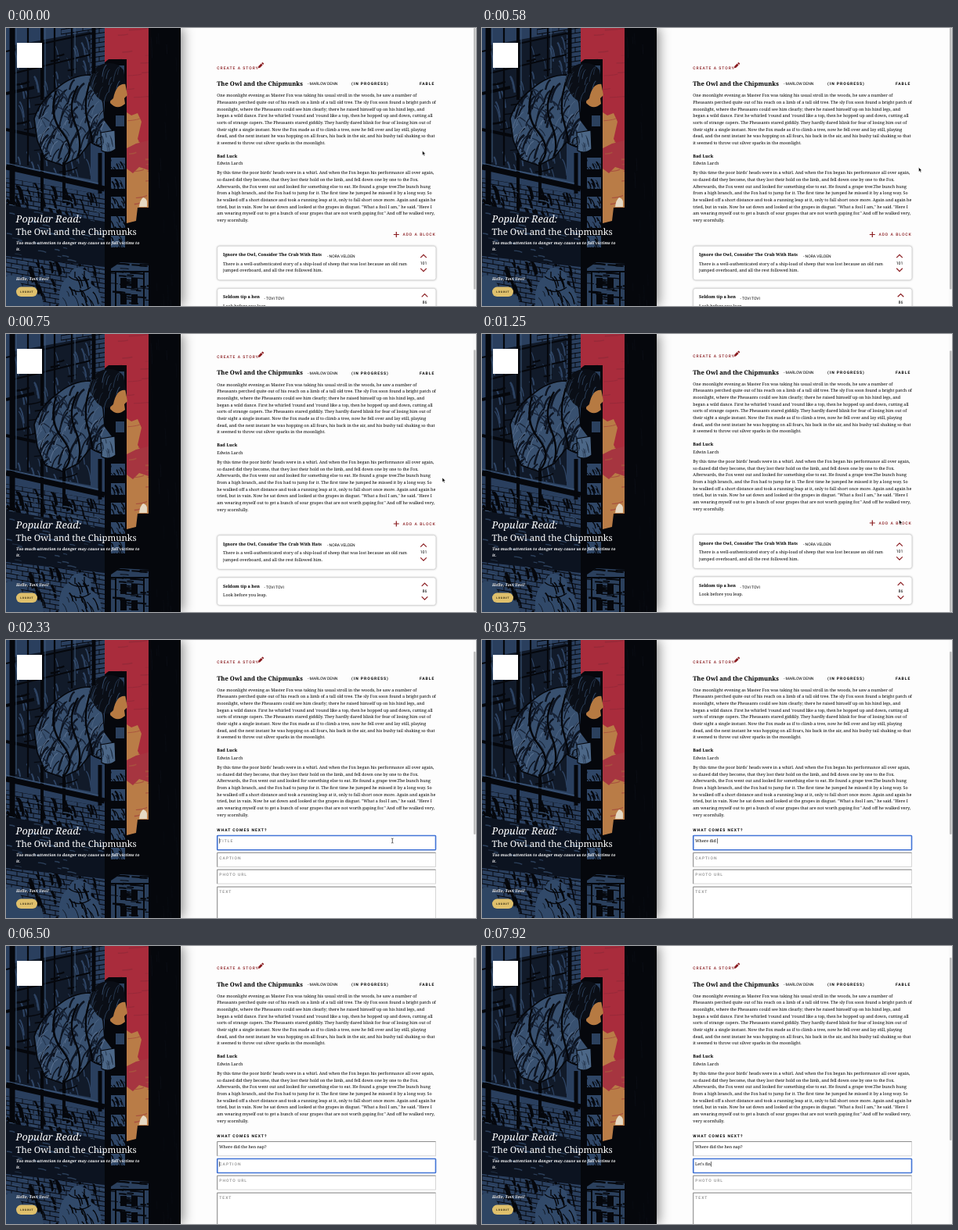
These frames come from a looping animation (600x356 px, 8000 ms). An HTML page with a canvas:

```html
<!DOCTYPE html>
<html lang="en">
<head>
<meta charset="utf-8">
<title>Story page</title>
<style>
html, body { margin: 0; width: 100%; height: 100%; overflow: hidden; background: #fdfdfd; }
svg, .panel { position: absolute; left: 0; top: 0; }
.panel { width: 223px; height: 356px; box-shadow: 3px 0 14px rgba(0,0,0,.45); }
canvas { display: block; }
text { text-rendering: geometricPrecision; white-space: pre; fill: #000; }
.body { font: 5.44px "Noto Serif", serif; }
.bold { font: bold 5.55px "Noto Serif", serif; }
.title { font: bold 7.7px "Noto Serif", serif; }
.by { font: 5px Roboto, sans-serif; }
.cap { font: bold 5px Roboto, sans-serif; letter-spacing: .97px; }
.link { font: 500 5px Roboto, sans-serif; letter-spacing: 1px; fill: #8a1c20; }
.hint { font: 500 5px Roboto, sans-serif; letter-spacing: 1px; fill: #8b8b8b; }
.vote { font: 5.2px Roboto, sans-serif; text-anchor: middle; }
.value { font: 5.3px "Noto Serif", serif; }
.lead { font: italic 12.7px "Noto Serif", serif; fill: #fff; }
.read { font: 11.4px "Noto Serif", serif; fill: #fff; }
.note { font: italic bold 5.1px "Noto Serif", serif; fill: #fff; }
.logout { font: bold 3.3px Roboto, sans-serif; letter-spacing: .7px; text-anchor: middle; fill: #2c2410; }
.card { fill: #fff; stroke: #cfcfcf; stroke-width: .7; filter: drop-shadow(0 .8px 1px rgba(0,0,0,.25)); }
.red { fill: none; stroke: #8a1c20; stroke-width: 1.2; }
</style>
</head>
<body>
<svg id="page" width="600" height="356"></svg>
<div class="panel"><canvas id="art" width="223" height="356"></canvas></div>
<svg id="over" width="223" height="356"></svg>
<script>
const LOOP = 8000, MAX_SCROLL = 22.5, FORM_AT = 1500, FOCUS_AT = 2250, NEXT_AT = 6050, HIDE_AT = 2750;
const STORY = "The Owl and the Chipmunks";

const page = document.getElementById("page"), over = document.getElementById("over");

function add(parent, tag, attrs = {}, str) {
  const el = document.createElementNS("http://www.w3.org/2000/svg", tag);
  for (const k in attrs) el.setAttribute(k, attrs[k]);
  if (str !== undefined) el.textContent = str;
  parent.appendChild(el);
  return el;
}
const text = (g, cls, x, y, str) => add(g, "text", { class: cls, x, y }, str);
const path = (g, d, attrs) => add(g, "path", { d, ...attrs });
const show = (el, on) => el.setAttribute("visibility", on ? "visible" : "hidden");

// Story
const doc = add(page, "g");
text(doc, "link", 269.3, 52.9, "CREATE A STORY");
path(doc, "M321.8 51.4l.7-2.6 3.2-3.2 1.9 1.9-3.2 3.2zM326.2 45.1l.9-.9q.4-.3.8 0l1.1 1.1q.3.4 0 .8l-.9.9z", { fill: "#8a1c20" });
text(doc, "title", 269.3, 74, STORY);
text(doc, "by", 385, 73.4, "- MARLOW DENN");
text(doc, "cap", 441, 73.2, "(IN PROGRESS)");
text(doc, "cap", 528, 73.2, "FABLE");

const lines = (g, y, step, rows) => rows.forEach((r, i) => text(g, "body", 269.3, y + i * step, r));
lines(doc, 88.3, 8.66, [
  "One moonlight evening as Master Fox was taking his usual stroll in the woods, he saw a number of",
  "Pheasants perched quite out of his reach on a limb of a tall old tree. The sly Fox soon found a bright patch of",
  "moonlight, where the Pheasants could see him clearly; there he raised himself up on his hind legs, and",
  "began a wild dance. First he whirled 'round and 'round like a top, then he hopped up and down, cutting all",
  "sorts of strange capers. The Pheasants stared giddily. They hardly dared blink for fear of losing him out of",
  "their sight a single instant. Now the Fox made as if to climb a tree, now he fell over and lay still, playing",
  "dead, and the next instant he was hopping on all fours, his back in the air, and his bushy tail shaking so that",
  "it seemed to throw out silver sparks in the moonlight."
]);
text(doc, "bold", 269.3, 165.8, "Bad Luck");
text(doc, "body", 269.3, 175.2, "Edwin Larch");
lines(doc, 187.4, 8.68, [
  "By this time the poor birds' heads were in a whirl. And when the Fox began his performance all over again,",
  "so dazed did they become, that they lost their hold on the limb, and fell down one by one to the Fox.",
  "Afterwards, the Fox went out and looked for something else to eat. He found a grape tree.The bunch hung",
  "from a high branch, and the Fox had to jump for it. The first time he jumped he missed it by a long way. So",
  "he walked off a short distance and took a running leap at it, only to fall short once more. Again and again he",
  "tried, but in vain. Now he sat down and looked at the grapes in disgust. \"What a fool I am,\" he said. \"Here I",
  "am wearing myself out to get a bunch of sour grapes that are not worth gaping for.\" And off he walked very,",
  "very scornfully."
]);

// Suggested blocks
const list = add(doc, "g");
path(list, "M498.3 261v7M494.8 264.5h7", { class: "red" });
text(list, "link", 506.5, 266.3, "ADD A BLOCK");

function card(y, h, title, by, byX, rows, votes, x) {
  const mid = y + h / 2;
  add(list, "rect", { class: "card", x: 269.7, y, width: 279.2, height: h, rx: 3 });
  text(list, "bold", 277, y + 12.9, title);
  text(list, "by", byX, y + 14.6, by);
  rows.forEach((r, i) => text(list, "body", 277, y + 24.4 + i * 8.6, r));
  path(list, `M${x - 3.8} ${mid - 6.8}l3.8 -3.8 3.8 3.8M${x - 3.8} ${mid + 6.8}l3.8 3.8 3.8 -3.8`, { class: "red" });
  text(list, "vote", x, mid + 1.9, votes);
}
card(279.2, 43.6, "Ignore the Owl, Consider The Crab With Hats", "- NORA VELDEN", 410, [
  "There is a well-authenticated story of a ship-load of sheep that was lost because an old ram",
  "jumped overboard, and all the rest followed him."
], "101", 533);
card(333.4, 35.4, "Seldom tip a hen", "- TOVI TOVI", 329.5, ["Look before you leap."], "86", 534.5);

// Form
const form = add(doc, "g");
text(form, "cap", 269.3, 267.3, "WHAT COMES NEXT?");

function field(y, h, hint) {
  const box = { x: 269.7, y, width: 278.8, height: h };
  add(form, "rect", { ...box, fill: "#fff", stroke: "#cdcdcd", "stroke-width": .8 });
  path(form, `M269.7 ${y + h}v${-h}h278.8`, { fill: "none", stroke: "#858585", "stroke-width": .9 });
  const ring = add(form, "rect", { ...box, rx: .8, fill: "none", stroke: "#4274d6", "stroke-width": 1.6 });
  return {
    ring,
    hint: text(form, "hint", 272.3, y + 8.3, hint),
    value: text(form, "value", 272, y + 8.5, ""),
    caret: add(form, "rect", { y: y + 3.5, width: .6, height: 6.6, fill: "#111" })
  };
}
const fields = [field(273, 18.3, "TITLE"), field(295, 18, "CAPTION"), field(316.6, 18, "PHOTO URL"), field(338.6, 60, "TEXT")];

const typed = [
  { str: "Where did the hen nap?", from: FOCUS_AT, to: NEXT_AT,
    keys: [...Array.from({ length: 14 }, (_, i) => HIDE_AT + i * 110), 4500, 4580, 4660, 5320, 5330, 5410, 5490, 5740] },
  { str: "Let's fin", from: NEXT_AT, to: LOOP,
    keys: [6830, 7000, 7160, 7330, 7500, 7660, 7750, 7830, 7910] }
];

function drawField(f, entry, t) {
  const focused = !!entry && t >= entry.from && t < entry.to;
  const n = entry ? entry.keys.filter(k => k <= t).length : 0;
  const str = entry ? entry.str.slice(0, n) : "";
  if (f.value.textContent !== str) f.value.textContent = str;
  show(f.ring, focused);
  show(f.hint, !n);
  let lit = false;
  if (focused) {
    const last = n ? entry.keys[n - 1] : entry.from;
    lit = (t - last) % 1000 < 500;
    f.caret.setAttribute("x", 272.2 + (n ? f.value.getComputedTextLength() : 0));
  }
  show(f.caret, lit);
}

// Scrollbar and pointer
add(page, "rect", { x: 596, width: 4, height: 356, fill: "#f9f9f9" });
const thumb = add(page, "rect", { x: 597, width: 2.6, rx: 1.3, fill: "#bdbdbd" });
const arrow = path(page, "M0 0v5.6l1.3-1.2.9 2 1-.4-.9-2h1.8z", { fill: "#000", stroke: "#fff", "stroke-width": .5 });
const beam = path(page, "M-1.3-3q1.3 0 1.3.8v4.4q0 .8-1.3.8M1.3-3q-1.3 0-1.3.8M0 2.2q0 .8 1.3.8", { fill: "none", stroke: "#222", "stroke-width": .7 });

const scrollKeys = [[580, 0], [750, 21.5], [830, MAX_SCROLL]];
const pointerKeys = [
  [80, 531.5, 157.3], [500, 557.5, 178.5], [580, 557.5, 178.5], [750, 557, 184], [920, 556, 188],
  [1250, 532.5, 238], [1420, 523, 240.5], [1750, 522, 241], [2170, 493.3, 257]
];

// Eased value between neighbouring keys
function at(keys, t, i = 1) {
  if (t <= keys[0][0]) return keys[0][i];
  for (let k = 1; k < keys.length; k++) {
    const a = keys[k - 1], b = keys[k];
    if (t < b[0]) {
      const u = (t - a[0]) / (b[0] - a[0]);
      return a[i] + (b[i] - a[i]) * u * u * (3 - 2 * u);
    }
  }
  return keys[keys.length - 1][i];
}

function frame(now) {
  const t = now % LOOP, scroll = at(scrollKeys, t), open = t >= FORM_AT;
  doc.setAttribute("transform", `translate(0 ${-scroll})`);
  list.style.display = open ? "none" : "";
  form.style.display = open ? "" : "none";
  fields.forEach((f, i) => drawField(f, typed[i], t));

  const full = open ? 541 : 356 + MAX_SCROLL;
  thumb.setAttribute("y", scroll * 356 / full);
  thumb.setAttribute("height", 356 * 356 / full);

  const x = at(pointerKeys, t, 1), y = at(pointerKeys, t, 2), inField = open && y > 250;
  for (const p of [arrow, beam]) p.setAttribute("transform", `translate(${x} ${y})`);
  show(arrow, !inField);
  show(beam, inField && t < HIDE_AT);
  requestAnimationFrame(frame);
}

// Side panel
add(over, "rect", { x: 14, y: 19, width: 32, height: 32, fill: "#fff" });
text(over, "lead", 12.6, 249, "Popular Read:");
text(over, "read", 12.6, 264.6, STORY);
text(over, "note", 13, 276.7, "Too much attention to danger may cause us to fall victims to");
text(over, "note", 13, 285.2, "it.");
text(over, "note", 13, 323, "Hello, Tovi Tovi!");
add(over, "rect", { x: 13, y: 331.6, width: 27, height: 12.4, rx: 6.2, fill: "#dfc06c" });
text(over, "logout", 26.8, 339, "LOGOUT");

// Night-time illustration
const ctx = document.getElementById("art").getContext("2d");
const INK = "#05070c";
let seed = 11;
const rnd = () => (seed = (seed * 16807) % 2147483647) / 2147483647;
const fill = (c, d) => { ctx.fillStyle = c; ctx.fill(new Path2D(d)); };
const line = (c, w, d) => { ctx.strokeStyle = c; ctx.lineWidth = w; ctx.stroke(new Path2D(d)); };

// Short random strokes inside a shape
function hatch(shape, n, [x, y, w, h], dx, dy, color, width) {
  ctx.save();
  ctx.clip(new Path2D(shape));
  for (let i = 0; i < n; i++) {
    const px = x + rnd() * w, py = y + rnd() * h, k = .5 + rnd();
    line(color, width * (.5 + rnd()), `M${px} ${py}q${dx * k * .7} ${dy * k * .2} ${dx * k} ${dy * k}`);
  }
  ctx.restore();
}

// Courses of bricks following a slope
function bricks(shape, [x, y, w, h], slope) {
  ctx.save();
  ctx.clip(new Path2D(shape));
  for (let row = 0; row * 6 < h; row++) {
    const by = y + row * 6;
    line(INK, 1, `M${x} ${by}l${w} ${w * slope}`);
    for (let bx = (row % 2) * 7; bx < w; bx += 14) line(INK, .9, `M${x + bx} ${by + bx * slope}v6`);
  }
  ctx.restore();
}

function drawArt() {
  const sky = "M126 0H182V250H126z";
  const dusk = "M154 108L160 112 168 109 173 120 168 142 176 156 182 160V250H154z";
  const pane = "M10 22L108 4V194L10 176z";
  const robe = "M36 116Q44 92 64 78Q84 60 108 60L118 76 124 96 126 118 138 134 134 150Q122 156 108 146L92 166 72 176 50 168 40 144z";
  const hair = "M106 72Q106 52 124 46Q142 42 150 54L153 72Q141 70 137 90Q128 100 116 88z";
  const cup = "M121 134L139 131 140 155Q131 162 122 157z";
  const yard = "M0 192L126 214V356H0z", roofs = "M134 308L146 300 182 302V356H134z";

  fill(INK, "M0 0H223V356H0z");
  fill("#2a3f5e", "M0 0H126V356H0z");
  bricks("M70 0H126V66H70z", [70, -10, 56, 76], -.15);
  fill("#a92c3c", sky);
  hatch(sky, 14, [120, 0, 60, 110], 18, -2, "#962a39", 1.2);
  fill("#b97c47", dusk);
  fill("#a63540", "M154 154L166 148 182 144V182L170 178 162 186 154 180z");
  hatch(dusk, 14, [154, 112, 28, 130], 14, -3, "#a8503f", 1.4);
  fill("#e6d9c4", "M170 229q1-9 5-12 4 1 5 5v7z");

  // Tall tower behind the figure
  fill(INK, "M126 44L131 40H154V356H126zM154 250L166 247 168 230H182V356H154zM182 0H223V356H182z");
  for (const y of [48, 70, 112]) fill("#2b405d", `M140 ${y}H151V${y + 14}H140z`);
  for (let y = 166; y < 290; y += 25) {
    const win = `M134 ${y}H152V${y + 15}H134z`;
    fill("#2f4666", win);
    hatch(win, 10, [132, y, 18, 15], 4, 8, INK, 1.2);
  }

  // Window and figure
  fill("#111a29", pane);
  hatch(pane, 75, [8, 10, 100, 180], 5, 18, "#2d4363", 1.6);
  hatch(pane, 30, [8, 10, 100, 180], 16, -4, INK, 2);
  fill("#38506f", robe);
  hatch(robe, 70, [34, 62, 100, 110], -10, 20, "#0d1421", 2);
  hatch(robe, 45, [34, 62, 100, 110], 12, 12, "#172337", 1.4);
  hatch(robe, 40, [34, 62, 100, 110], -7, 13, "#566d8c", .8);
  line(INK, 1.6, robe);
  line(INK, 2.4, "M108 66Q98 96 104 118T110 146M64 80Q54 112 72 134T74 174M92 74Q78 98 88 122T92 164");
  fill("#b67a42", "M134 78Q144 66 152 70L155 86 151 90 152 97Q142 106 133 96z");
  fill("#0a0e16", hair);
  hatch(hair, 22, [106, 46, 42, 42], -5, 14, "#2d425e", .8);
  fill("#4c6787", cup);
  line(INK, 1.2, cup + "M121 140q-7 1-5 9 3 5 7 2");
  hatch(cup, 10, [121, 134, 14, 18], 2, 8, "#18263a", 1);

  // Frames and sill
  line(INK, 7, "M8 0V240M0 178L126 206");
  line(INK, 4, "M46 0V92M46 160V240M0 84L36 76M74 172V224M0 130L38 138");
  line(INK, 2.2, "M28 0V176M62 0V78M84 0V62M10 58L108 34M0 30L112 6");
  line(INK, 5, "M112 0V58M120 160V212");
  line("#3f5a7d", 1, "M0 173L118 199M13 0V172M50 0V88M88 0V58");

  // Wall and creatures below
  bricks(yard, [0, 186, 126, 175], .17);
  hatch(yard, 110, [0, 195, 120, 160], 5, 15, INK, 2.6);
  hatch(yard, 40, [0, 200, 120, 150], 10, 3, "#3b5474", 1);
  fill("#0c1320", "M0 226L126 248V306L0 292z");
  hatch("M0 226L126 248V306L0 292z", 40, [0, 226, 124, 76], 9, 2, "#2b3f5a", 1.2);
  fill("#314969", "M68 356Q66 326 80 318Q86 302 98 309Q112 312 108 328Q122 334 122 356z");
  line(INK, 1.3, "M80 318Q89 326 106 322M82 334Q94 342 108 332M88 312v8M100 311v8");
  hatch("M68 356L80 318 98 309 122 356z", 24, [68, 312, 52, 42], 5, 11, INK, 1.2);
  fill("#2e4563", "M0 356V318Q14 312 20 330L46 344 48 356z");

  // Rooftops
  fill("#2b405d", roofs);
  hatch(roofs, 40, [130, 300, 52, 56], 12, 1, INK, 1.6);
  line(INK, 2, "M134 312H182M140 312V356M176 312V356");
  for (let x = 146; x < 174; x += 14) fill(INK, `M${x} 320h8v13h-8zM${x} 341h8v13h-8z`);
  hatch("M184 0H223V356H184z", 24, [184, 0, 39, 356], 1, 18, "#0a0d14", .8);
}

drawArt();
requestAnimationFrame(frame);
</script>
</body>
</html>
```
